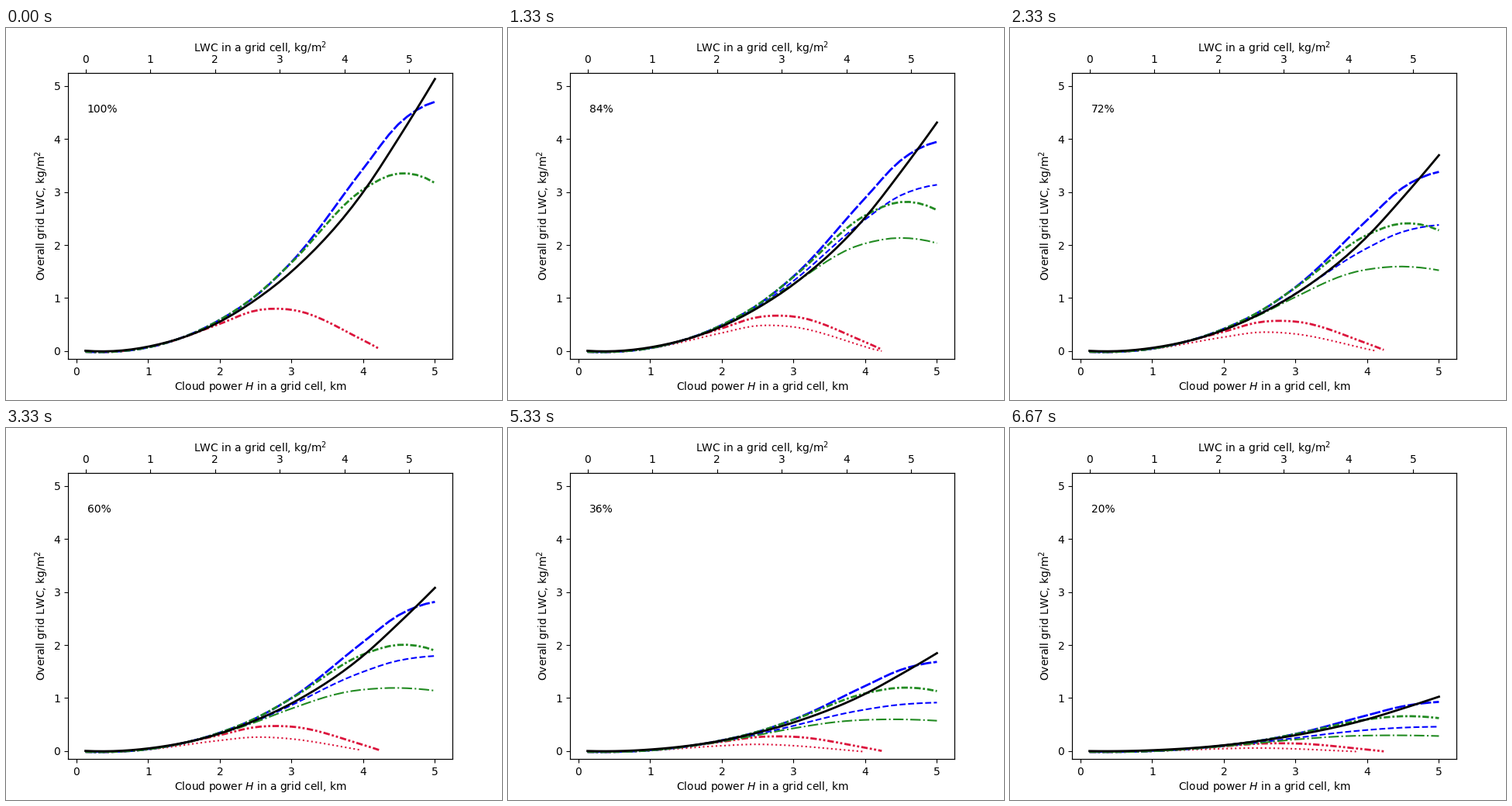
These frames come from a looping animation (640 px wide and 480 px high, 7 s). A matplotlib script:

```python
import numpy as np
import matplotlib.pyplot as plt
from matplotlib.animation import FuncAnimation

FRAMES, INTERVAL = 175, 40
STEPS = 21       # cloud cover falls from 100% to 20% in hard steps
OFFSET = -0.015  # retrieval bias that does not scale with cover

H = np.linspace(0.125, 5, 39)
KEYS = np.array([0.1, 0.5, 1, 2, 2.5, 3, 4, 4.5, 5])


def curve(*ys):
    """Cubic Hermite curve through values at KEYS, sampled on H."""
    ys = np.array(ys)
    m = np.gradient(ys, KEYS, edge_order=2)
    i = np.clip(np.searchsorted(KEYS, H, side="right") - 1, 0, len(KEYS) - 2)
    w = KEYS[i + 1] - KEYS[i]
    t = (H - KEYS[i]) / w
    return ((1 + 2 * t) * (1 - t) ** 2 * ys[i] + t * (1 - t) ** 2 * w * m[i]
            + t * t * (3 - 2 * t) * ys[i + 1] + t * t * (t - 1) * w * m[i + 1])


truth = curve(0.01, 0, 0.085, 0.555, 0.97, 1.5, 3.0, 4.03, 5.13)
blue = curve(-0.01, -0.012, 0.07, 0.59, 1.04, 1.68, 3.44, 4.29, 4.7)
green = curve(-0.01, -0.012, 0.07, 0.59, 1.045, 1.67, 3.05, 3.35, 3.17)
red = curve(-0.01, -0.012, 0.07, 0.515, 0.765, 0.78, 0.205, -0.15, -0.4)
red[H > 4.25] = np.nan


def full(w, f):
    return OFFSET + f * (w - OFFSET)


def mixed(w, tau, gain, f):
    """Value retrieved when clear and cloudy parts of a cell are averaged."""
    if f == 1:
        return np.full_like(H, np.nan)
    tau = np.maximum(tau, 1e-6)
    ratio = -np.log(1 - f * (1 - np.exp(-tau))) / (f * tau)
    share = 1 - gain * (1 - ratio)
    return np.where(share > 0, full(w * share, f), np.nan)


# values, optical depth, loss gain, colour, thick dashes, thin style
SERIES = [
    (red, 2.2, 0.39 * H + 1.47 * np.exp(6 * (H - 4.2)),
     "crimson", (3, 1, 1, 1, 1, 1), ":"),
    (blue, blue / 2.57, 1, "blue", (5, 1), "--"),
    (green, green / (2.1 - 0.11 * H), 1, "forestgreen", (3, 1, 1, 1), "-."),
]

fig, ax = plt.subplots(figsize=(6.4, 4.8), dpi=100)
ax.set_xlim(-0.11875, 5.24375)
ax.set_ylim(-0.15, 5.25)
ax.set_xlabel("Cloud power $H$ in a grid cell, km", labelpad=2.1)
ax.set_ylabel("Overall grid LWC, kg/m$^2$", labelpad=3)
top = ax.twiny()
top.set_xlim(-0.2698, 5.6648)
top.set_xlabel("LWC in a grid cell, kg/m$^2$", labelpad=2.1)

pairs = []
for *_, color, dashes, style in SERIES:
    thick, = ax.plot([], [], color=color, lw=2, ls=(0, dashes))
    thin, = ax.plot([], [], color=color, lw=1.5, ls=style)
    pairs.append((thick, thin))
black, = ax.plot([], [], color="black", lw=2)
label = ax.text(0.15, 4.5, "")


def update(n):
    step = int((n + 0.7) * STEPS / FRAMES)
    percent = 100 - 4 * step
    f = percent / 100
    for (thick, thin), (w, tau, gain, *_) in zip(pairs, SERIES):
        thick.set_data(H, full(w, f))
        thin.set_data(H, mixed(w, tau, gain, f))
    black.set_data(H, f * truth)
    label.set_text(f"{percent}%")
    return [black, label]


anim = FuncAnimation(fig, update, frames=FRAMES, init_func=lambda: update(0),
                     interval=INTERVAL, repeat=True, repeat_delay=0)
plt.show()
```
